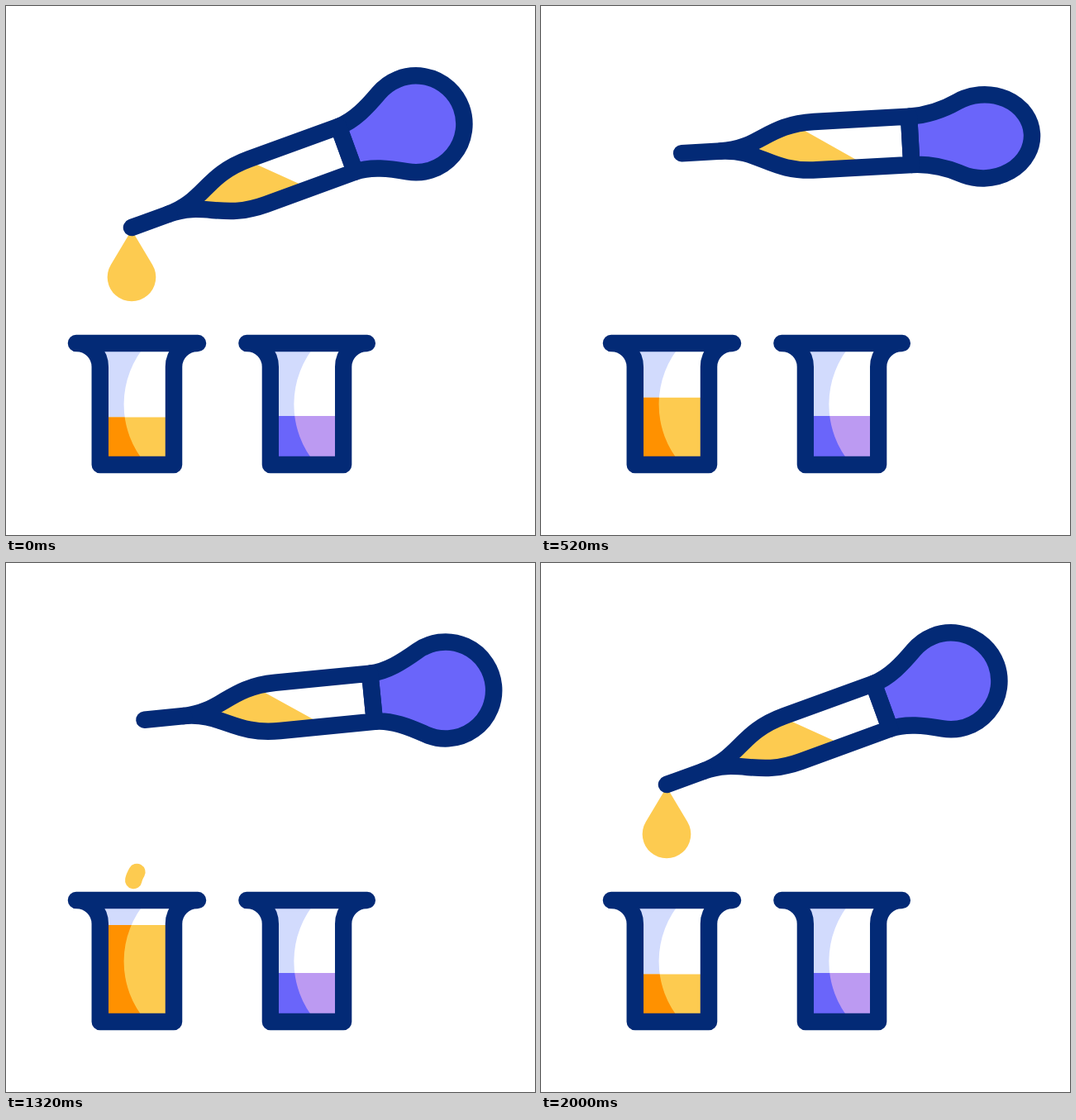
An HTML page that plays this animation: 640x640 px, repeating every 2.74 s.

```html
<!DOCTYPE html>
<html lang="en">
<head>
<meta charset="utf-8">
<title>Dropper and beakers</title>
<style>
  html, body { margin: 0; width: 100%; height: 100%; overflow: hidden; background: #fff; }
  svg { display: block; width: 100%; height: 100%; }
  .line { fill: none; stroke: #032a76; stroke-width: 20.5; stroke-linecap: round; stroke-linejoin: round; }
  .tint { fill: #d2dbfd; }
  .gold { fill: #fdcb50; }
</style>
</head>
<body>
<svg viewBox="0 0 640 640">
  <defs>
    <path id="glass" d="M85 408A28.5 28.5 0 0 1 113.8 436.5V555H203V436.5A28.5 28.5 0 0 1 232 408Z"/>
    <path id="shade" d="M85 408H171A110.8 110.8 0 0 0 170 555H85Z"/>
    <path id="tube" d="M47 0C95 0 105 -29.2 162 -29.2H277V29.2H162C105 29.2 95 0 47 0Z"/>
    <clipPath id="inGlass"><use href="#glass"/></clipPath>
    <clipPath id="inTube"><use href="#tube"/></clipPath>
    <clipPath id="leftLevel"><rect id="level" x="85" width="150" height="200"/></clipPath>
    <clipPath id="rightLevel"><rect x="85" y="496" width="150" height="200"/></clipPath>
  </defs>

  <g clip-path="url(#inGlass)"><use href="#shade" class="tint"/></g>
  <path id="drop" class="gold" d="M0 0L25.1 41.9A29.3 29.3 0 1 1 -25.1 41.9Z"/>
  <path id="stream" fill="none" stroke="#fdcb50" stroke-width="20.5" stroke-linecap="round" stroke-linejoin="round"/>
  <g clip-path="url(#leftLevel)">
    <use href="#glass" class="gold"/>
    <g clip-path="url(#inGlass)"><use href="#shade" fill="#ff9100"/></g>
  </g>
  <use href="#glass" class="line"/>

  <g transform="translate(207.2 0) scale(.99 1)">
    <g clip-path="url(#inGlass)"><use href="#shade" class="tint"/></g>
    <g clip-path="url(#rightLevel)">
      <use href="#glass" fill="#bc9af2"/>
      <g clip-path="url(#inGlass)"><use href="#shade" fill="#6a65fa"/></g>
    </g>
    <use href="#glass" class="line"/>
  </g>

  <g id="dropper">
    <g clip-path="url(#inTube)"><path id="fluid" class="gold"/></g>
    <path id="bulb" class="line" style="fill:#6a65fa"/>
    <use href="#tube" class="line"/>
    <path class="line" d="M0 0H48"/>
  </g>
</svg>
<script>
const LOOP = 2740, END = 2000, STEP = 20;
const PIVOT = { x: 465, y: 284.5 }, TIP = { x: 152, y: 268 };
const BULB = 58.5;

// Tables of [time, value]
const swing = [[0, 0], [370, 20], [955, .5], [1520, 20], [1930, 0]];
const driftX = [[0, 0], [540, 0], [740, -1], [1080, 3], [1320, 1.5], [1680, .8], [2000, 0]];
const driftY = [[0, 0], [540, 0], [740, 3], [1080, -1.7], [1320, -1], [1680, 1], [2000, 0]];
const squeeze = [[365, BULB], [620, 46.5], [900, BULB], [1520, BULB], [1720, 47.5], [2000, BULB]];
const level = [[0, 497.5], [350, 477], [1310, 438], [1790, 497.5]];
const fluidTop = [[0, 169], [300, 162], [740, 138], [1080, 138], [1320, 147.5], [1680, 163.4], [2000, 169]];
const fluidLow = [[0, 208], [300, 217.5], [740, 201.6], [1080, 199], [1320, 203], [1680, 208]];
const head = [[1271, 384], [1680, 300], [1880, 260]];
const tail = [[1440, 384], [1680, 343], [1920, 264]];

const $ = id => document.getElementById(id);
const linear = s => s;
const smooth = s => s * s * (3 - 2 * s);

function at(keys, t, ease = linear) {
  if (t <= keys[0][0]) return keys[0][1];
  for (let i = 1; i < keys.length; i++) {
    const [t0, a] = keys[i - 1], [t1, b] = keys[i];
    if (t <= t1) return a + (b - a) * ease((t - t0) / (t1 - t0));
  }
  return keys[keys.length - 1][1];
}

// The neck curves run tangent into an ellipse of half-height h.
function bulbPath(h) {
  const q = h / BULB, join = 50.7 * q, bend = 39.7 * q;
  return `M277 -29.2C297 -29.2 317.7 ${-bend} 336.8 ${-join}` +
    `A${BULB} ${h} 0 1 1 336.8 ${join}C317.7 ${bend} 297 29.2 277 29.2Z`;
}

function streamPath(top, low) {
  const n = 24;
  let d = '';
  for (let i = 0; i <= n; i++) {
    const y = low + (top - low) * i / n;
    const x = 159.5 - 5.5 * Math.cos((y - 327) * Math.PI / 30);
    d += (i ? 'L' : 'M') + x.toFixed(2) + ' ' + y.toFixed(2);
  }
  return d;
}

function tipAt(angle, dx, dy) {
  const r = angle * Math.PI / 180, c = Math.cos(r), s = Math.sin(r);
  const x = TIP.x - PIVOT.x, y = TIP.y - PIVOT.y;
  return { x: PIVOT.x + x * c - y * s + dx, y: PIVOT.y + x * s + y * c + dy };
}

function draw(t) {
  const angle = at(swing, t, smooth);
  const tip = tipAt(angle, at(driftX, t), at(driftY, t));

  $('dropper').setAttribute('transform',
    `translate(${tip.x} ${tip.y}) rotate(${angle - 20})`);
  $('bulb').setAttribute('d', bulbPath(at(squeeze, t, smooth)));

  const a = at(fluidTop, t), b = at(fluidLow, t), k = (b - a) * 11 / 38;
  $('fluid').setAttribute('d', `M40 -30H${a - k}L${b + k} 30H40Z`);
  $('level').setAttribute('y', at(level, t, smooth));

  // The drop falls first, and a new one swells at the tip near the end.
  const falling = t < 280, swelling = t > 1860;
  $('drop').style.display = falling || swelling ? '' : 'none';
  if (falling) {
    const fall = 205 * Math.pow(t / 280, 1.6);
    $('drop').setAttribute('transform', `translate(152 ${271 + fall})`);
  } else if (swelling) {
    const size = smooth((t - 1860) / (END - 1860));
    $('drop').setAttribute('transform', `translate(${tip.x} ${tip.y + 3}) scale(${size})`);
  }

  const rising = t > 1271 && t < 1920;
  $('stream').style.display = rising ? '' : 'none';
  if (rising) $('stream').setAttribute('d', streamPath(Math.max(at(head, t), tip.y), at(tail, t)));
}

const start = performance.now();
function tick() {
  const t = (performance.now() - start) % LOOP;
  draw(Math.min(END, Math.floor(t / STEP) * STEP));
  requestAnimationFrame(tick);
}
tick();
</script>
</body>
</html>
```
